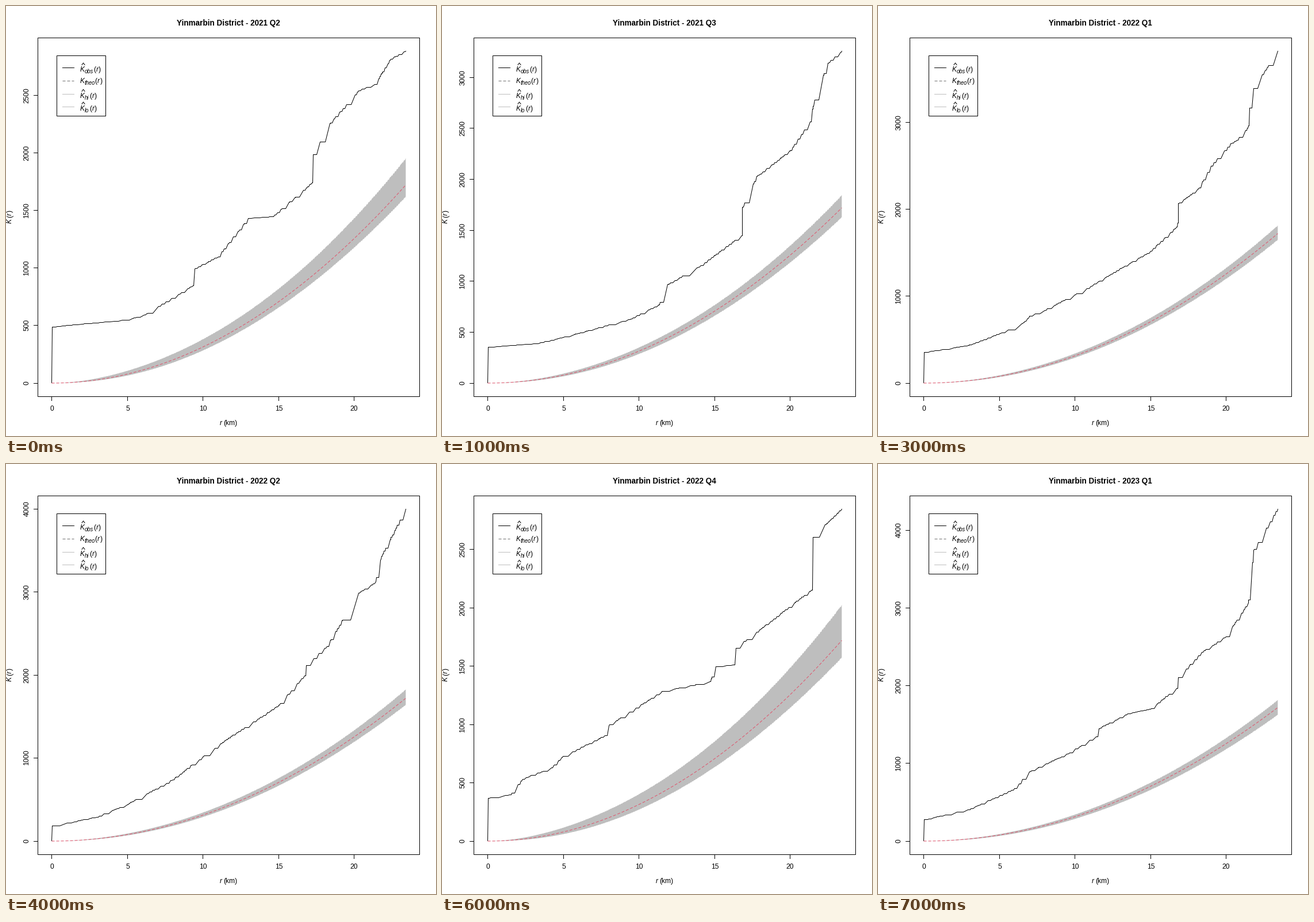
These frames come from a looping animation (748 by 748 pixels, 8000 ms). A matplotlib script:

```python
import numpy as np
import matplotlib.pyplot as plt
from matplotlib.animation import FuncAnimation
from matplotlib.patches import Polygon, Rectangle

SIZE, DPI = 748, 64
PT = 72 / DPI                      # points per pixel
X0, Y0, X_KM = 79.5, 656, 26.32    # plot origin and pixels per km
R_MAX, HEIGHT = 23.4, 577.8
GREY, RED = "#bebebe", "#df536b"
R = np.linspace(0, R_MAX, 200)
THEO = np.pi * R ** 2
plt.rcParams["font.family"] = "Liberation Sans"


class Quarter:
    """Envelope widths above and below, and key points (km, K) of the curve."""

    def __init__(self, name, above, below, keys):
        self.name, self.above, self.below = name, above, below
        self.r, self.k = np.array(keys, float).T
        self.k_max = self.k[-1]


def between(name, a, b):
    r = np.union1d(a.r, b.r)
    k = (np.interp(r, a.r, a.k) + np.interp(r, b.r, b.k)) / 2
    return Quarter(name, (a.above + b.above) / 2, (a.below + b.below) / 2,
                   np.column_stack((r, k)))


q2_21 = Quarter("2021 Q2", 0.13, 0.055, [
    (0.05, 488), (4.9, 548), (6.1, 589), (9.35, 848), (9.45, 993), (11, 1098),
    (13, 1430), (14.6, 1445), (17.2, 1737), (17.3, 1986), (18.4, 2255),
    (20.3, 2540), (21.4, 2595), (22.4, 2815), (R_MAX, 2884)])

q3_21 = Quarter("2021 Q3", 0.07, 0.05, [
    (0.05, 350), (3.3, 389), (6, 488), (9.4, 626), (11.3, 767), (11.9, 965),
    (14.1, 1155), (16.8, 1450), (16.85, 1726), (17.8, 2030), (20, 2280),
    (21.3, 2566), (21.6, 2780), (22.5, 3140), (R_MAX, 3260)])

q4_21 = Quarter("2021 Q4", 0.045, 0.035, [
    (0.05, 522), (3.3, 590), (6.6, 787), (7, 895), (10.8, 1050), (15, 1400),
    (16.8, 1606), (16.85, 2009), (18.2, 2140), (19, 2400), (20.7, 2550),
    (21.45, 2758), (21.55, 3085), (21.8, 3350), (R_MAX, 3640)])

q2_22 = Quarter("2022 Q2", 0.06, 0.042, [
    (0.05, 180), (3, 290), (5, 443), (8, 740), (10, 1017), (12, 1280),
    (15, 1633), (16.7, 1993), (16.85, 2118), (18.2, 2346), (20.3, 2990),
    (21.4, 3114), (21.8, 3430), (R_MAX, 4000)])

q4_22 = Quarter("2022 Q4", 0.17, 0.08, [
    (0.05, 369), (1.5, 399), (2.3, 532), (4.2, 626), (5, 729), (7.8, 906),
    (8, 990), (11.5, 1281), (14.7, 1365), (15.1, 1493), (16.3, 1512),
    (16.4, 1655), (21.4, 2153), (21.5, 2606), (R_MAX, 2847)])

q1_23 = Quarter("2023 Q1", 0.055, 0.05, [
    (0.05, 274), (3, 407), (6, 674), (7, 895), (9.6, 1132), (11.4, 1347),
    (11.6, 1451), (13.5, 1643), (15, 1702), (16.7, 1968), (16.85, 2110),
    (18.4, 2435), (20, 2635), (21.45, 3072), (21.8, 3745), (R_MAX, 4278)])

QUARTERS = [q2_21, q3_21, q4_21, between("2022 Q1", q4_21, q2_22),
            q2_22, between("2022 Q3", q2_22, q4_22), q4_22, q1_23]


def stairs(r, k, gap, seed):
    """Break a curve into small irregular steps: flat, then rising."""
    rng = np.random.default_rng(seed)
    rs = np.union1d(r, rng.uniform(r[0], r[-1], int(R_MAX / gap)))
    ks = np.interp(rs, r, k)
    mid = (rs[:-1] + rs[1:]) / 2
    step_r = np.column_stack((mid, rs[1:])).ravel()
    step_k = np.column_stack((ks[:-1], ks[1:])).ravel()
    return np.append(rs[0], step_r), np.append(ks[0], step_k)


def to_px(r, k, k_max):
    return X0 + r * X_KM, Y0 - k * HEIGHT / k_max


def edge(width, seed):
    """One side of the envelope; its relative width shrinks with distance."""
    return stairs(R, THEO * (1 + width * (1 + 5 * np.exp(-R / 5))), 0.2, seed)


fig = plt.figure(figsize=(SIZE / DPI, SIZE / DPI), dpi=DPI, facecolor="white")
ax = fig.add_axes([0, 0, 1, 1])
ax.set(xlim=(0, SIZE), ylim=(SIZE, 0))
ax.axis("off")


def line(x=(), y=(), color="black", **kw):
    return ax.plot(x, y, color=color, lw=PT, **kw)[0]


def dashed(x=(), y=(), color=RED, **kw):
    return line(x, y, color, dashes=(5, 3), dash_capstyle="butt", **kw)


def text(x, y, s="", size=12, **kw):
    return ax.text(x, y, s, fontsize=size * PT, va="baseline",
                   rotation_mode="anchor", **kw)


def frame_box(x, y, w, h):
    ax.add_patch(Rectangle((x, y), w, h, fc="none", ec="black", lw=PT,
                           joinstyle="miter", zorder=5))


def legend_text(base, sub, paren, hat=True):
    text(128.5, base, "K", style="italic")
    text(136.5, base + 3, sub, 9.5, style="italic")
    text(paren, base, "(")
    text(paren + 4.4, base, "r", style="italic")
    text(paren + 9.2, base, ")")
    if hat:
        line([132, 134.5, 137], [base - 11.5, base - 15, base - 11.5])


# Moving parts
band = ax.add_patch(Polygon(np.eye(3, 2), fc=GREY, ec="none", zorder=1))
obs = line(zorder=3)
theo = dashed(zorder=4)
title = text(387, 34, size=13.5, weight="bold", ha="center")
y_ticks = [line([48, 55], [Y0, Y0]) for _ in range(8)]
y_names = [text(39.5, Y0, rotation=90, ha="center") for _ in range(8)]

# Fixed axes
frame_box(55, 55, 664, 624)
for km in range(0, 21, 5):
    x = int(X0 + km * X_KM)
    line([x, x], [679, 686])
    text(x + 0.5, 704.5, str(km), ha="center")
text(372, 729, "r", style="italic")
text(378.5, 729, "(km)")
text(10, 378, "K", style="italic", rotation=90)
text(10, 368, "(", rotation=90)
text(10, 363.5, "r", style="italic", rotation=90)
text(10, 358.8, ")", rotation=90)

# Legend
frame_box(88, 86, 85, 105)
line([98, 118], [107, 107])
dashed([98, 118], [130, 130], "#6f6f6f")
line([98, 118], [153, 153], GREY)
line([98, 118], [175, 175], GREY)
legend_text(114, "obs", 152)
legend_text(134, "theo", 154.5, hat=False)
legend_text(160, "hi", 145)
legend_text(182, "lo", 145)


def update(i):
    q = QUARTERS[i]
    title.set_text(f"Yinmarbin District - {q.name}")

    hx, hy = to_px(*edge(q.above, 10 + i), q.k_max)
    lx, ly = to_px(*edge(-q.below, 20 + i), q.k_max)
    band.set_xy(np.column_stack((np.append(hx, lx[::-1]),
                                 np.append(hy, ly[::-1]))))

    # Pixel centres keep the steps crisp
    x, y = to_px(*stairs(q.r, q.k, 0.2, i), q.k_max)
    obs.set_data(np.floor(np.append(X0, x)) + 0.5,
                 np.floor(np.append(Y0 - 1, y)) + 0.5)
    theo.set_data(*to_px(R, THEO, q.k_max))

    step = 500 if q.k_max < 3500 else 1000
    for n, (tick, name) in enumerate(zip(y_ticks, y_names)):
        k = n * step
        y = int(to_px(0, k, q.k_max)[1])
        tick.set_ydata([y, y])
        name.set_y(y)
        name.set_text(str(k))
        for part in (tick, name):
            part.set_visible(k <= q.k_max * 1.04)
    return [band, obs, theo, title, *y_ticks, *y_names]


anim = FuncAnimation(fig, update, frames=len(QUARTERS), interval=1000,
                     repeat=True, blit=False)
plt.show()
```
